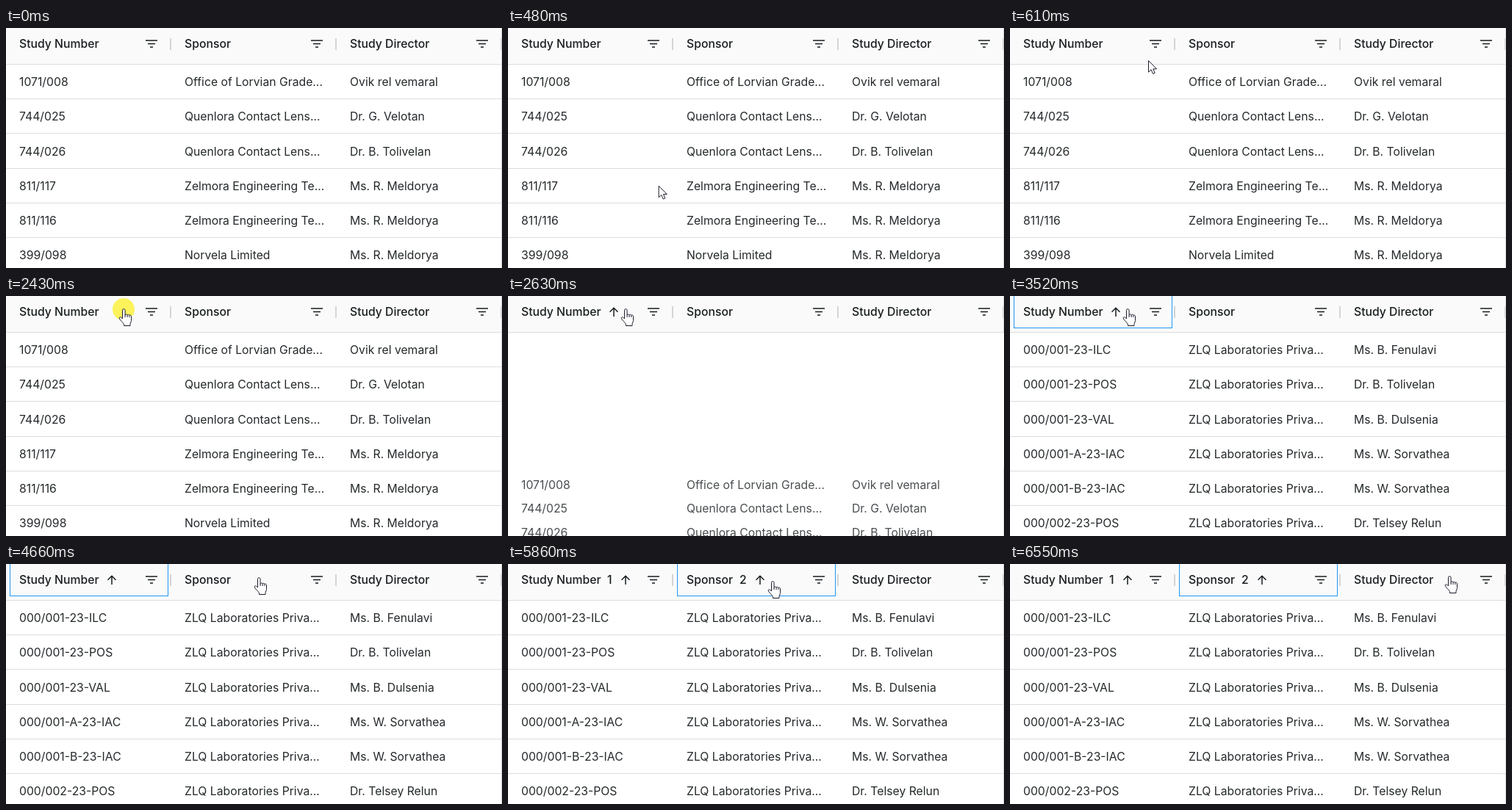
An HTML page that plays this animation: 675 px wide and 327 px high, repeating every 8000 ms.

```html
<!DOCTYPE html>
<html lang="en">
<head>
<meta charset="utf-8">
<title>Multi-column sorting</title>
<style>
  html, body { margin: 0; width: 100%; height: 100%; overflow: hidden; background: #fff; }
  #stage {
    position: relative; width: 675px; height: 327px; overflow: hidden;
    font: 400 15.75px Inter, sans-serif; color: #181d1f; white-space: pre;
  }
  .row {
    position: absolute; left: 0; width: 675px; box-sizing: border-box;
    background: #fff; border: solid #dcdddd; border-width: 0 1px 1px 0; color: #24292b;
  }
  .row span, header span { position: absolute; top: 0; }
  .row span { top: 1px; }
  .moving .row { color: #4a4e50; border-color: #e4e5e5; }
  header {
    position: absolute; inset: 0 0 auto; height: 49px; line-height: 43px;
    background: #fafafa; border: solid #dcdddd; border-width: 0 1px 1px 0; font-weight: 500;
  }
  #focus {
    position: absolute; top: -2px; width: 216px; height: 46px;
    box-sizing: border-box; border: 1px solid #2196f3;
  }
  svg { position: absolute; left: 0; top: 0; }
  .icons { fill: none; stroke: #181d1f; stroke-width: 1.5; }
  .bar { stroke: #d3d5d6; stroke-width: 2; }
  #pointer { fill: #fff; stroke: #1c1c2c; stroke-width: 1; stroke-linejoin: round; }
</style>
</head>
<body>
<div id="stage">
  <div id="rows"></div>
  <header id="header">
    <div id="focus"></div>
    <span id="rank1" style="left:135px">1</span>
    <span id="rank2" style="left:315px">2</span>
    <svg class="icons" width="675" height="49">
      <defs>
        <path id="filter" d="M-8 17H8M-5 21.5H5M-2 26H2"/>
        <path id="up" d="M0 28V16.5M-5.5 21.8L0 16.3L5.5 21.8"/>
      </defs>
      <g id="tools"></g>
      <use id="sort1" href="#up"/>
      <use id="sort2" href="#up" x="343"/>
    </svg>
  </header>
  <svg width="675" height="327">
    <circle id="click" r="15" fill="#fbf25c"/>
    <g id="pointer">
      <path id="arrow" d="M-.5 .5V16.2L3.1 12.8L5.6 18.4L8.2 17.3L5.8 11.8H10.6Z"/>
      <path id="hand" transform="translate(-7 -1.5)" d="M5.5 14.5V3a1.8 1.8 0 0 1 3.6 0V9.6a1.7 1.7 0 0 1 3-.3a1.7 1.7 0 0 1 2.8 .6a1.6 1.6 0 0 1 2.6 1.3V17c0 2-1.5 3-1.5 5V24H7.5V22C6 19 2.5 17 1.5 14.5C.5 12 3 11.6 4 13ZM9.1 9.5V12.5M12.1 9.5V12.5M14.9 10V12.5"/>
    </g>
  </svg>
</div>
<script>
const LOOP = 8000, COLUMN = 225, PAD = 18;
const ROW_PITCH = 47.25, TRAVEL = 593;
const SLIDE = { delay: 2538, duration: 446, easing: 'ease', fill: 'both' };
const SLIDE_TICKS = [2560, 2630, 2690, 2760, 2840, 2910, 2985];

const zelmora = 'Zelmora Engineering Te...', lab = 'ZLQ Laboratories Priva...';
const unsorted = [
  ['1071/008', 'Office of Lorvian Grade...', 'Ovik rel vemaral'],
  ['744/025', 'Quenlora Contact Lens...', 'Dr. G. Velotan'],
  ['744/026', 'Quenlora Contact Lens...', 'Dr. B. Tolivelan'],
  ['811/117', zelmora, 'Ms. R. Meldorya'],
  ['811/116', zelmora, 'Ms. R. Meldorya'],
  ['399/098', 'Norvela Limited', 'Ms. R. Meldorya']
];
const sorted = [
  ['000/001-23-ILC', lab, 'Ms. B. Fenulavi'],
  ['000/001-23-POS', lab, 'Dr. B. Tolivelan'],
  ['000/001-23-VAL', lab, 'Ms. B. Dulsenia'],
  ['000/001-A-23-IAC', lab, 'Ms. W. Sorvathea'],
  ['000/001-B-23-IAC', lab, 'Ms. W. Sorvathea'],
  ['000/002-23-POS', lab, 'Dr. Telsey Relun']
];

// Pointer hot spot: time, x, y, number of steps to the next point (0 = rest).
const track = [
  [410, 214, 300, 3], [610, 189, 44, 9], [1170, 165, 19, 2], [1300, 160, 18, 0],
  [3850, 172, 16, 6], [4260, 318, 9, 0], [4660, 344, 19, 1], [4720, 350.5, 25, 0],
  [5860, 360, 24, 8], [6360, 582, 14, 3], [6550, 598, 17, 0]
];

const $ = id => document.getElementById(id);
const show = (id, on) => { $(id).style.visibility = on ? 'visible' : 'hidden'; };
const within = (t, from, to) => t >= from && t < to;

function addText(parent, text, column) {
  const span = document.createElement('span');
  span.textContent = text;
  span.style.left = column * COLUMN + PAD + 'px';
  parent.append(span);
}

const rowTop = i => Math.round(49.8 + ROW_PITCH * i);

function addRow(cells, i, arriving) {
  const row = document.createElement('div');
  const height = rowTop(i + 1) - rowTop(i);
  row.className = 'row';
  row.style.cssText = `top:${rowTop(i)}px;height:${height}px;line-height:${height - 1}px`;
  cells.forEach((text, c) => addText(row, text, c));
  $('rows').append(row);
  const home = { transform: 'translateY(0px)' };
  const away = { transform: `translateY(${TRAVEL - ROW_PITCH * i}px)` };
  const slide = row.animate(arriving ? [away, home] : [home, away], SLIDE);
  slide.pause();
  return slide;
}

const slides = [
  ...unsorted.map((cells, i) => addRow(cells, i, false)),
  ...sorted.map((cells, i) => addRow(cells, i, true))
];

['Study Number', 'Sponsor', 'Study Director'].forEach((title, c) => {
  addText($('header'), title, c);
  $('tools').innerHTML += `<use href="#filter" x="${c * COLUMN + 198}"/>
    <path class="bar" d="M${c * COLUMN + 224} 14V30"/>`;
});

function pointerAt(t) {
  const i = track.findLastIndex(point => t >= point[0]);
  if (i < 0) return null;
  const [t0, x0, y0, steps] = track[i];
  if (!steps) return [x0, y0];
  const [t1, x1, y1] = track[i + 1];
  let p = Math.floor((t - t0) / (t1 - t0) * steps + 1e-6) / steps;
  if (steps > 5) p = p * p * (3 - 2 * p);
  return [x0 + (x1 - x0) * p, y0 + (y1 - y0) * p];
}

function draw(t) {
  const slideTime = SLIDE_TICKS.findLast(tick => t >= tick) || 0;
  slides.forEach(slide => { slide.currentTime = slideTime; });
  $('rows').className = within(t, 2560, 2980) ? 'moving' : '';

  const multi = t >= 5120;
  show('sort1', t >= 2560);
  $('sort1').setAttribute('x', multi ? 160 : 144);
  ['rank1', 'rank2', 'sort2'].forEach(id => show(id, multi));
  show('focus', t >= 3520);
  $('focus').style.left = (t >= 5050 ? 230 : 5) + 'px';

  const spot = pointerAt(t);
  const clicking = within(t, 2430, 2560) || within(t, 5050, 5120);
  const isHand = t >= 800;
  show('arrow', spot && !isHand);
  show('hand', spot && isHand);
  show('click', clicking);
  if (!spot) return;
  const place = `translate(${spot})`;
  $('pointer').setAttribute('transform', place);
  $('click').setAttribute('transform', place);
}

const start = performance.now();
function frame() {
  draw((performance.now() - start) % LOOP);
  requestAnimationFrame(frame);
}
frame();
</script>
</body>
</html>
```
